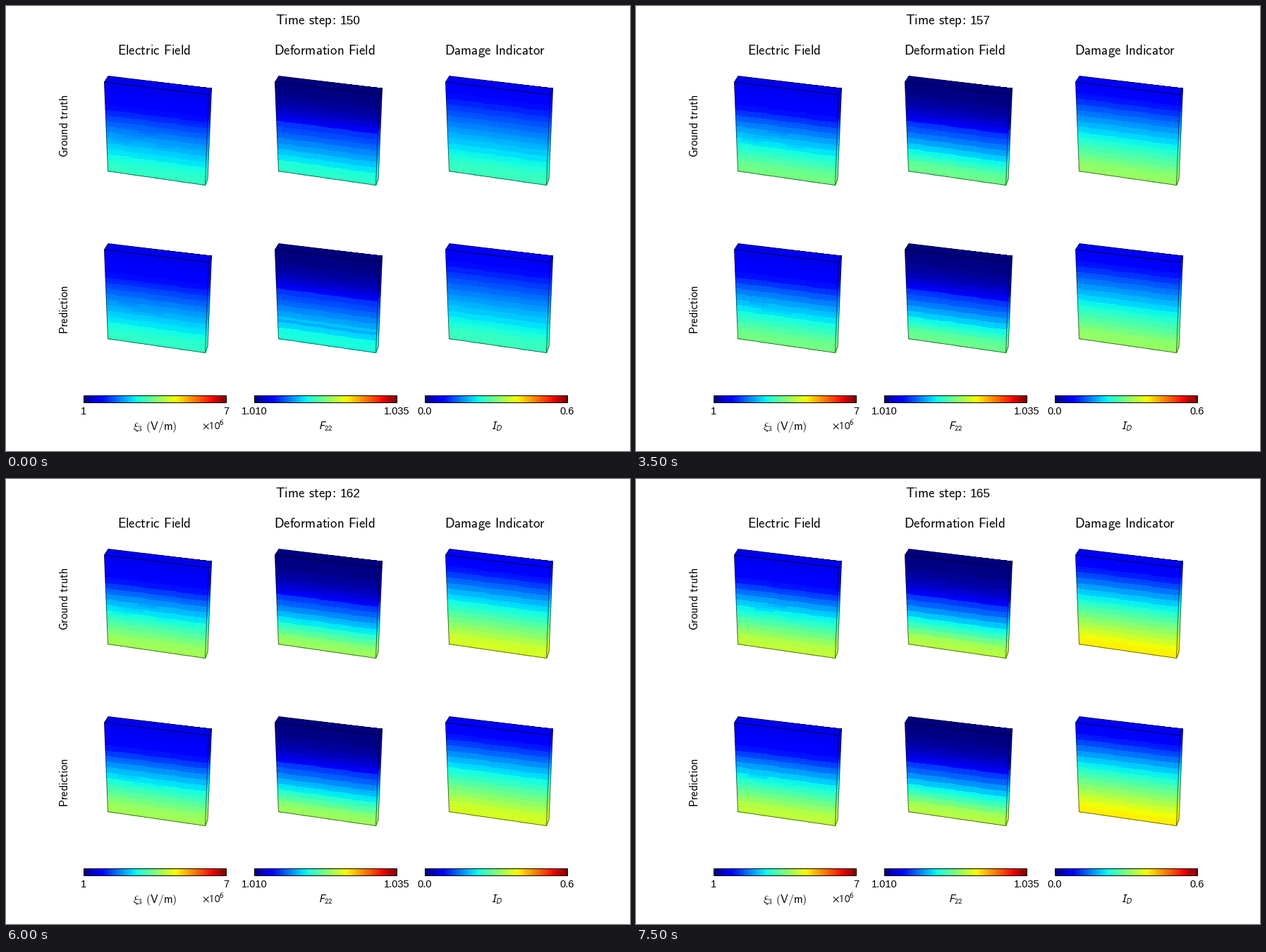
A matplotlib script for the animation above (8000 ms loop, 885x632 px).

```python
import matplotlib as mpl
import matplotlib.pyplot as plt
import numpy as np
from matplotlib.animation import FuncAnimation
from matplotlib.collections import LineCollection
from matplotlib.colors import ListedColormap

W, H, DPI = 885, 632, 64
PX = 72 / DPI                      # points per pixel
FRAMES, INTERVAL = 16, 500
FIRST_STEP = 150
ROWS, COLS = 32, 16
COL_STEP, ROW_STEP = 242, 238

mpl.rcParams["mathtext.fontset"] = "cm"
JET = mpl.colormaps["jet"]
DARK_JET = ListedColormap(JET(np.linspace(0, 1, 256))[:, :3] * 0.4)

# Corners of the top-left box
TL, TR, BR, BL = (139, 107.5), (287, 125.5), (282, 254), (144, 234)
BACK_L, BACK_R, BACK_B = (144.5, 99), (291, 116.7), (285.6, 245)

# Depth profile: slow rise to a knee, then a power law down to the bottom.
# Pairs hold the normalised value at the first and the last step.
FIELDS = [
    dict(name="Electric Field", low="1", high="7", top=.10, knee=.30,
         mid=(.14, .15), jump=0, bottom=(.41, .58), power=.9, jags=5),
    dict(name="Deformation Field", low="1.010", high="1.035", top=0, knee=.44,
         mid=(.12, .12), jump=.05, bottom=(.40, .57), power=1.2, streak=.03),
    dict(name="Damage Indicator", low="0.0", high="0.6", top=.11, knee=.20,
         mid=(.15, .18), jump=0, bottom=(.42, .655), power=.95),
]


def profile(field, k):
    t = k / (FRAMES - 1)
    rows = np.arange(ROWS)
    layer = (rows // 2 * 2 + 1) / ROWS
    s = 0.75 * layer + 0.25 * (rows + 0.5) / ROWS
    knee, top = field["knee"], field["top"]
    mid, bottom = (a + (b - a) * t for a, b in (field["mid"], field["bottom"]))
    upper = top + (mid - top) * (s / knee) ** 2
    start = mid + field["jump"]
    u = np.clip((s - knee) / (0.93 - knee), 0, 1)
    lower = start + (bottom - start) * u ** field["power"]
    return np.where(s < knee, upper, lower)


def lerp(p, q, n):
    return np.linspace(p, q, n + 1)


def segments(p, q, n=1):
    pts = lerp(p, q, n)
    return list(zip(pts[:-1], pts[1:]))


class Box:
    def __init__(self, ax, row, col):
        self.field, self.predicted = FIELDS[col], row == 1
        self.offset = np.array([col * COL_STEP, row * ROW_STEP]) + 0.5
        rng = np.random.default_rng(7 + row)
        self.noise = rng.uniform(-1, 0, ROWS)
        self.jags = [(2 * rng.integers(2, 11), rng.integers(1, 12))
                     for _ in range(self.field.get("jags", 0))]
        self.front = self.face(ax, TL, TR, BR, BL, ROWS, COLS)
        self.side = self.face(ax, TR, BACK_R, BACK_B, BR, ROWS, 1)
        self.top = self.face(ax, BACK_L, BACK_R, TR, TL, 1, 1)
        lines = (segments(TL, BL, ROWS) + segments(TR, BR, ROWS)
                 + segments(BACK_R, BACK_B, ROWS)
                 + segments(BL, BR) + segments(BR, BACK_B)
                 + segments(TL, TR) + segments(TL, BACK_L)
                 + segments(BACK_L, BACK_R) + segments(BACK_R, TR))
        self.edges = LineCollection([np.array(s) + self.offset for s in lines],
                                    cmap=DARK_JET, norm=plt.Normalize(0, 1),
                                    linewidths=0.9 * PX, capstyle="round")
        ax.add_collection(self.edges)

    def face(self, ax, a, b, c, d, rows, cols):
        left, right = lerp(a, d, rows), lerp(b, c, rows)
        grid = np.stack([lerp(p, q, cols) for p, q in zip(left, right)])
        grid = grid + self.offset
        return ax.pcolormesh(grid[..., 0], grid[..., 1],
                             np.zeros((rows, cols)), cmap=JET, vmin=0, vmax=1)

    def update(self, k):
        v = profile(self.field, k)
        if self.predicted:         # early streaks that soon fade
            fade = self.field.get("streak", 0) * np.exp(-1.2 * k)
            v += fade * self.noise * (np.arange(ROWS) > 0.75 * ROWS)
        cells = np.repeat(v[:, None], COLS, axis=1)
        for r, c in self.jags:     # short runs that lag behind their layer
            cells[r, c:c + 3] = (v[r - 1] + v[r]) / 2
        self.front.set_array(cells)
        self.side.set_array(v[:, None])
        self.top.set_array(v[:1, None])
        self.edges.set_array(np.r_[v, v, v, [v[-1]] * 2, [0] * 4])


def sans(s):
    s = s.replace(" ", r"\hspace{0.38}").replace(":", r"\!:")
    return r"$\mathsf{%s}$" % s


def label(ax, x, y, s, size=16, ha="center", **kw):
    return ax.text(x, y, s, fontsize=size * PX, ha=ha, va="baseline", **kw)


def number(ax, x, y, s, size=14.6, **kw):
    return label(ax, x, y, s, size, family="Liberation Sans", **kw)


def colorbar(ax, x0, low, high):
    x1, y0, y1 = x0 + 202, 553, 563
    ax.imshow(np.linspace(0, 1, 256)[None], cmap=JET, aspect="auto",
              extent=(x0, x1, y1, y0), interpolation="nearest")
    ax.add_patch(plt.Rectangle((x0, y0), x1 - x0, y1 - y0, fill=False,
                               ec="black", lw=PX))
    number(ax, x0, 580.5, low)
    number(ax, x1, 580.5, high)


fig = plt.figure(figsize=(W / DPI, H / DPI), dpi=DPI, facecolor="white")
ax = fig.add_axes([0, 0, 1, 1])

boxes = [Box(ax, r, c) for r in range(2) for c in range(3)]
for i, field in enumerate(FIELDS):
    label(ax, 210.2 + i * 241.8, 69, sans(field["name"]), 19)
    colorbar(ax, 110 + i * COL_STEP, field["low"], field["high"])

for y, name in [(170.5, "Ground truth"), (431, "Prediction")]:
    label(ax, 87.5, y, sans(name), 16.2, rotation=90, rotation_mode="anchor")

label(ax, 211.5, 602, r"$\xi_{\mathsf{3}}\ \mathsf{(V/m)}$")
for x, text in [(294, r"$\times 10^6$"), (453, "$F_{22}$"), (695.5, "$I_D$")]:
    label(ax, x, 601.5, text, 15, math_fontfamily="stixsans")
label(ax, 381.5, 26, sans("Time step:"), 19, ha="left")
clock = number(ax, 474, 26, "", 17.2, ha="left")

ax.set_xlim(0, W)
ax.set_ylim(H, 0)
ax.axis("off")


def update(k):
    clock.set_text(str(FIRST_STEP + k))
    for box in boxes:
        box.update(k)


anim = FuncAnimation(fig, update, frames=FRAMES, interval=INTERVAL,
                     repeat=True, repeat_delay=0, blit=False)
plt.show()
```
